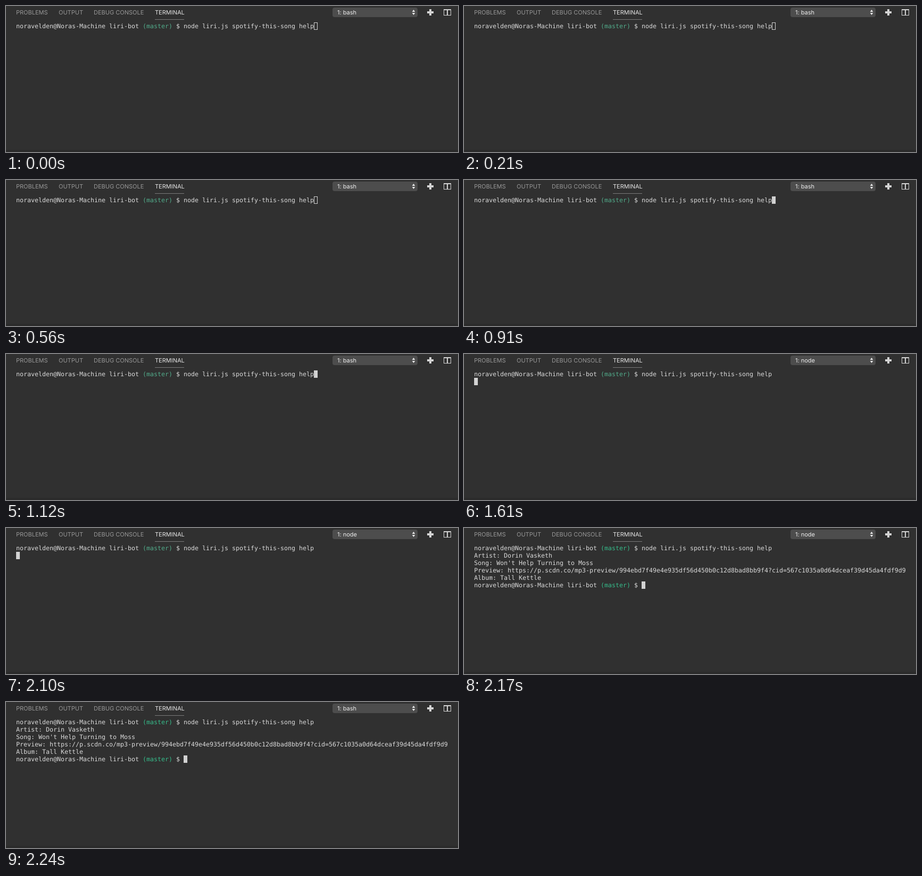
These frames come from a looping animation (850 by 276 pixels, 4.06 s). An HTML page with a canvas:

```html
<!DOCTYPE html>
<html lang="en">
<head>
<meta charset="utf-8">
<title>Terminal</title>
<style>
  html, body { margin: 0; width: 100%; height: 100%; overflow: hidden; background: #303030; }
  canvas { display: block; }
</style>
</head>
<body>
<canvas id="stage" width="850" height="276"></canvas>
<script>
const ctx = document.getElementById('stage').getContext('2d');
const LOOP = 4060;
const FOCUS_AT = 910, ENTER_AT = 1540, NODE_AT = 1610, OUTPUT_AT = 2170, DONE_AT = 2240;
const UI_FONT = '11px Inter, Roboto, sans-serif';
const MONO_FONT = '11.63px "DejaVu Sans Mono", monospace';
const LEFT = 19, CELL = 7, ROW = 14, TOP = 31;

const HOST = 'noravelden@Noras-Machine liri-bot ';
const BRANCH = '(master)';
const COMMAND = 'node liri.js spotify-this-song help';
const PROMPT_LENGTH = HOST.length + BRANCH.length + 3;
const OUTPUT = [
  'Artist: Dorin Vasketh',
  "Song: Won't Help Turning to Moss",
  'Preview: https://p.scdn.co/mp3-preview/994ebd7f49e4e935df56d450b0c12d8bad8bb9f4?cid=567c1035a0d64dceaf39d45da4fdf9d9',
  'Album: Tall Kettle'
];

function rect(x, y, w, h, color) {
  ctx.fillStyle = color;
  ctx.fillRect(x, y, w, h);
}

function label(text, x, y, color, font = UI_FONT) {
  ctx.font = font;
  ctx.fillStyle = color;
  ctx.fillText(text, x, y);
}

function cells(text, col, row, color = '#dadada') {
  label(text, LEFT + col * CELL, TOP + 11 + row * ROW, color, MONO_FONT);
}

function prompt(row, green, command = '') {
  cells(HOST, 0, row);
  cells(BRANCH, HOST.length, row, green);
  cells(' $ ' + command, HOST.length + BRANCH.length, row);
}

function cursor(col, row, filled) {
  const x = LEFT + col * CELL, y = TOP + row * ROW;
  if (filled) return rect(x, y, CELL, ROW, '#d2d2d2');
  ctx.strokeStyle = '#d2d2d2';
  ctx.lineWidth = 1;
  ctx.strokeRect(x + 0.5, y + 0.5, CELL - 1, ROW - 1);
}

function triangle(x, y, height) {
  ctx.beginPath();
  ctx.moveTo(x - 2.8, y);
  ctx.lineTo(x + 2.8, y);
  ctx.lineTo(x, y + height);
  ctx.fill();
}

function header(shell) {
  label('PROBLEMS', 19, 16, '#989898');
  label('OUTPUT', 99, 16, '#989898');
  label('DEBUG CONSOLE', 165, 16, '#989898');
  label('TERMINAL', 280, 16, '#e7e7e7');
  rect(280, 25, 55, 1, '#7c7c7c');

  ctx.fillStyle = '#4d4d4d';
  ctx.beginPath();
  ctx.roundRect(614, 3, 160, 18, 4);
  ctx.fill();
  label('1: ' + shell, 623, 16, '#eeeeee');
  ctx.fillStyle = '#eeeeee';
  triangle(766.5, 11, -4);
  triangle(766.5, 13, 4);

  rect(796, 6, 4, 12, '#d4d4d4');
  rect(792, 10, 12, 4, '#d4d4d4');

  // Split-pane icon
  rect(823, 6, 14, 12, '#d4d4d4');
  rect(824, 8, 5, 9, '#303030');
  rect(831, 8, 5, 9, '#303030');
}

function draw(time) {
  const finished = time >= OUTPUT_AT;
  const green = finished ? '#36bd8b' : '#52ac8b';
  rect(0, 0, 850, 276, '#303030');
  rect(0, 272, 850, 4, '#2b2b2b');
  header(time >= NODE_AT && time < DONE_AT ? 'node' : 'bash');
  prompt(0, green, COMMAND);
  if (finished) {
    OUTPUT.forEach((line, i) => cells(line, 0, i + 1));
    prompt(5, green);
    cursor(PROMPT_LENGTH, 5, true);
  } else if (time >= ENTER_AT) {
    cursor(0, 1, true);
  } else {
    cursor(PROMPT_LENGTH + COMMAND.length, 0, time >= FOCUS_AT);
  }
}

ctx.textRendering = 'geometricPrecision';
const start = performance.now();
function frame() {
  draw((performance.now() - start) % LOOP);
  requestAnimationFrame(frame);
}
frame();
</script>
</body>
</html>
```
